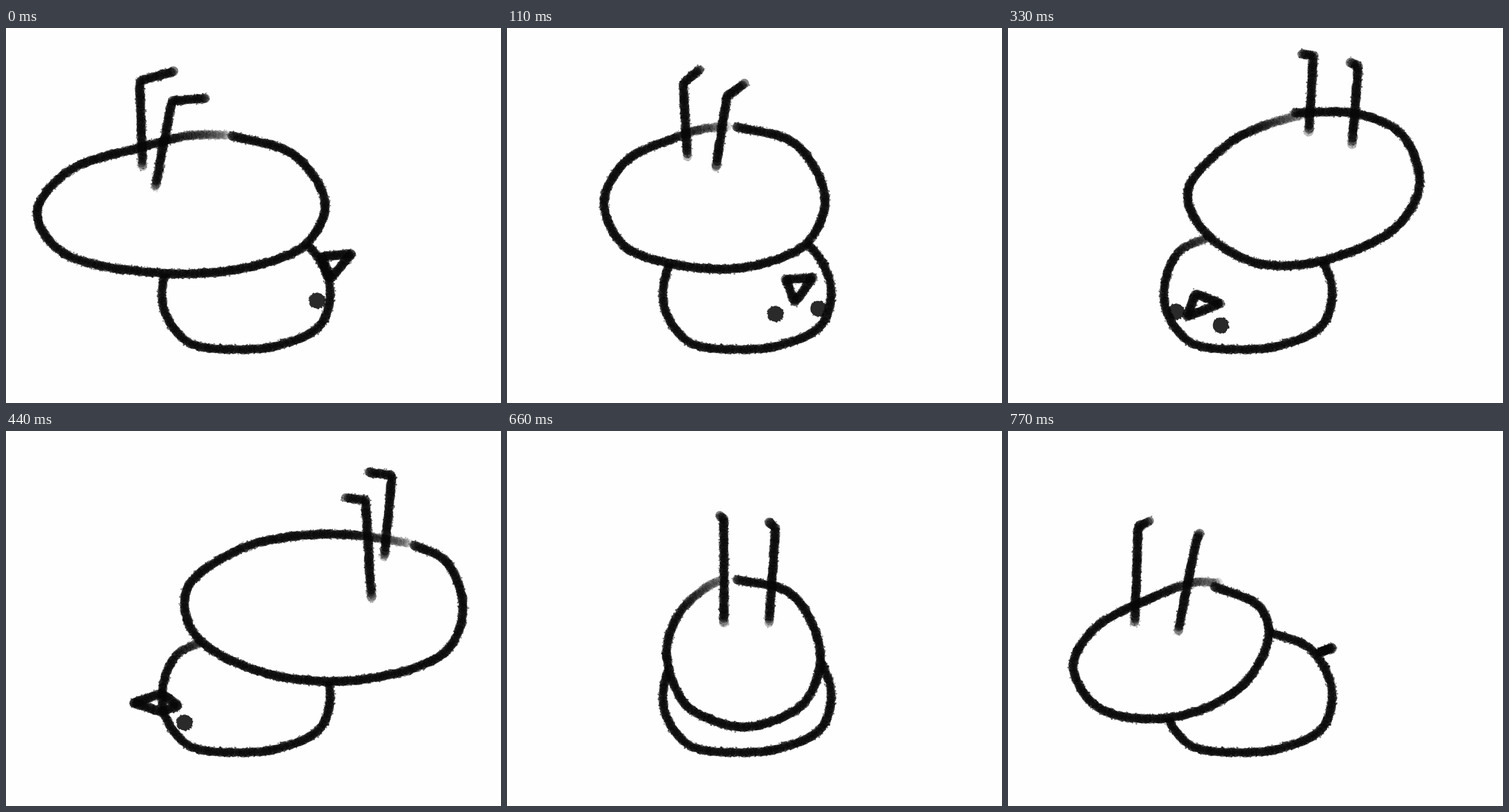
An HTML page with a canvas that plays this animation: 859x652 px, repeating every 0.88 s.

```html
<!DOCTYPE html>
<html lang="en">
<head>
<meta charset="utf-8">
<title>Wiggling bird</title>
<style>
  html, body { margin: 0; width: 100%; height: 100%; overflow: hidden; background: #fefefe; }
  #stage { position: relative; width: 859px; height: 652px; overflow: hidden; }
  #strip { position: absolute; left: 0; top: 0; animation: flip 880ms steps(8) infinite; }
  @keyframes flip { to { transform: translateX(-100%); } }
</style>
</head>
<body>
<div id="stage"><canvas id="strip"></canvas></div>
<script>
const W = 859, H = 652, PAPER = '#fefefe';

const mix = (a, b) => a.map((v, i) => (v + b[i]) / 2);
const mixLegs = (a, b) => a.legs.map((leg, i) => mix(leg, b.legs[i]));
const shift = (flat, dx, dy) => flat.map((v, i) => v + (i % 2 ? dy : dx));

// Key points as x, y pairs; bodies run clockwise, legs go from foot over knee to hip.
const HEAD = [455,350, 525,379, 562,450, 546,516, 475,551, 395,559, 316,546, 275,492, 275,432, 300,386, 346,365];

const farRight = {
  body: [392,187, 500,221, 554,305, 520,376, 405,419, 240,424, 95,388, 54,322, 105,251, 240,206, 320,187, 385,186],
  legs: [[291,76, 232,92, 237,242], [346,122, 288,127, 259,277]],
  beak: [548,398, 600,392, 563,436],
  eyes: [[540,474]]
};
const front = {
  body: [405,156, 500,182, 550,285, 520,372, 428,412, 365,402, 313,370, 283,285, 305,215, 345,175, 362,164, 383,156],
  legs: [[378,68, 380,100, 389,208], [477,72, 476,110, 466,208]],
  beak: [420,477, 462,476, 436,517],
  eyes: [[390,518], [488,511]]
};
const left = {
  body: [498,147, 610,150, 685,187, 714,270, 675,345, 540,406, 430,408, 340,353, 312,285, 380,203, 455,166, 512,151],
  legs: [[510,45, 530,48, 522,182], [595,60, 608,66, 597,204]],
  beak: [326,462, 369,479, 310,502],
  eyes: [[292,493], [369,517]]
};
const farLeft = {
  body: [708,198, 765,228, 793,315, 760,386, 600,434, 430,415, 325,350, 314,275, 400,208, 485,185, 590,180, 700,195],
  legs: [[630,72, 670,77, 656,222], [590,116, 624,120, 634,290]],
  beak: [222,473, 270,456, 299,478, 268,488],
  eyes: [[310,507]]
};
const backLeft = {
  body: [560,228, 658,276, 710,390, 660,485, 595,501, 490,489, 375,415, 334,330, 400,229, 490,205, 570,218],
  legs: [[493,138, 527,142, 533,333], [578,138, 605,147, 614,322]],
  beak: [261,422, 274,427],
  eyes: []
};
const backRight = {
  body: [358,270, 437,306, 452,360, 405,444, 290,497, 160,483, 113,410, 150,344, 250,290, 325,263, 366,264],
  legs: [[245,157, 226,166, 220,334], [332,178, 327,190, 295,349]],
  beak: [562,377, 540,385],
  eyes: []
};
const right = {
  body: mix(farRight.body, front.body),
  legs: mixLegs(farRight, front),
  beak: mix(farRight.beak, front.beak),
  eyes: [[466,497], [540,488]]
};
const back = {
  body: shift(front.body, -6, 102),
  legs: mixLegs(backLeft, backRight),
  beak: [],
  eyes: []
};
const POSES = [farRight, right, front, left, farLeft, backLeft, back, backRight];

const canvas = document.getElementById('strip');
canvas.width = W * POSES.length;
canvas.height = H;
const ctx = canvas.getContext('2d');

let seed = 1;
function random() {
  seed = (seed * 16807) % 2147483647;
  return seed / 2147483647;
}
const spread = size => (random() * 2 - 1) * size;
const distance = (a, b) => Math.hypot(b[0] - a[0], b[1] - a[1]);

function pairs(flat) {
  const points = [];
  for (let i = 0; i < flat.length; i += 2) points.push([flat[i], flat[i + 1]]);
  return points;
}

// Centripetal Catmull-Rom curve; the ends are extended by reflection.
function curve(flat) {
  const p = pairs(flat), n = p.length, out = [];
  const reflect = (a, b) => [2 * a[0] - b[0], 2 * a[1] - b[1]];
  const all = [reflect(p[0], p[1]), ...p, reflect(p[n - 1], p[n - 2])];
  for (let i = 0; i < n - 1; i++) {
    const q = all.slice(i, i + 4), knots = [0];
    for (let k = 1; k < 4; k++) knots.push(knots[k - 1] + Math.sqrt(distance(q[k - 1], q[k])));
    for (let s = 0; s < 1; s += 1 / 20) {
      const t = knots[1] + s * (knots[2] - knots[1]);
      const blend = (a, b, from, to) => {
        const w = (t - knots[from]) / (knots[to] - knots[from]);
        return [a[0] + (b[0] - a[0]) * w, a[1] + (b[1] - a[1]) * w];
      };
      const [a, b, c] = [0, 1, 2].map(k => blend(q[k], q[k + 1], k, k + 1));
      out.push(blend(blend(a, b, 0, 2), blend(b, c, 1, 3), 1, 2));
    }
  }
  out.push(p[n - 1]);
  return out;
}

// Evenly spaced points along a polyline.
function resample(points, step) {
  const out = [];
  let carry = 0;
  for (let i = 1; i < points.length; i++) {
    const [x, y] = points[i - 1], dx = points[i][0] - x, dy = points[i][1] - y;
    const length = Math.hypot(dx, dy);
    let s = carry;
    for (; s < length; s += step) out.push([x + dx * s / length, y + dy * s / length]);
    carry = s - length;
  }
  return out;
}

function dot(x, y, r) {
  ctx.beginPath();
  ctx.arc(x, y, r, 0, Math.PI * 2);
  ctx.fill();
}

// Ragged dots around a circle.
function fringe(x, y, radius, count) {
  for (let n = 0; n < count; n++) {
    const angle = random() * Math.PI * 2, reach = radius + spread(1.6);
    dot(x + Math.cos(angle) * reach, y + Math.sin(angle) * reach, 0.6 + random());
  }
}

// Chalky brush; the last `fade` pixels of the stroke grow lighter.
function brush(points, radius, fade, lightest) {
  const step = 3, dabs = resample(points, step);
  ctx.fillStyle = '#080808';
  dabs.forEach(([x, y], i) => {
    const strength = Math.min(1, (dabs.length - i) * step / fade);
    ctx.globalAlpha = lightest + (0.5 - lightest) * strength;
    dot(x + spread(0.9), y + spread(0.9), radius + spread(0.8));
    fringe(x, y, radius, 5);
  });
  ctx.globalAlpha = 1;
}

function eye([x, y]) {
  ctx.fillStyle = '#2a2a2a';
  dot(x, y, 13.5);
  fringe(x, y, 13, 50);
}

function fillPaper(points) {
  ctx.fillStyle = PAPER;
  ctx.beginPath();
  points.forEach(([x, y]) => ctx.lineTo(x, y));
  ctx.fill();
}

ctx.fillStyle = PAPER;
ctx.fillRect(0, 0, canvas.width, H);

POSES.forEach(({ body, legs, beak, eyes }, i) => {
  ctx.setTransform(1, 0, 0, 1, i * W, 0);
  seed = 71;
  eyes.forEach(eye);
  seed = 4099;
  brush(curve(HEAD), 7.6, 75, 0.24);
  const outline = curve(body);
  fillPaper(outline);
  brush(outline, 7.8, 110, 0.12);
  brush(pairs([...beak, ...beak.slice(0, 2)]), 8, 1, 0.5);
  legs.forEach(leg => brush(pairs(leg), 7.9, 14, 0.2));
});
</script>
</body>
</html>
```
